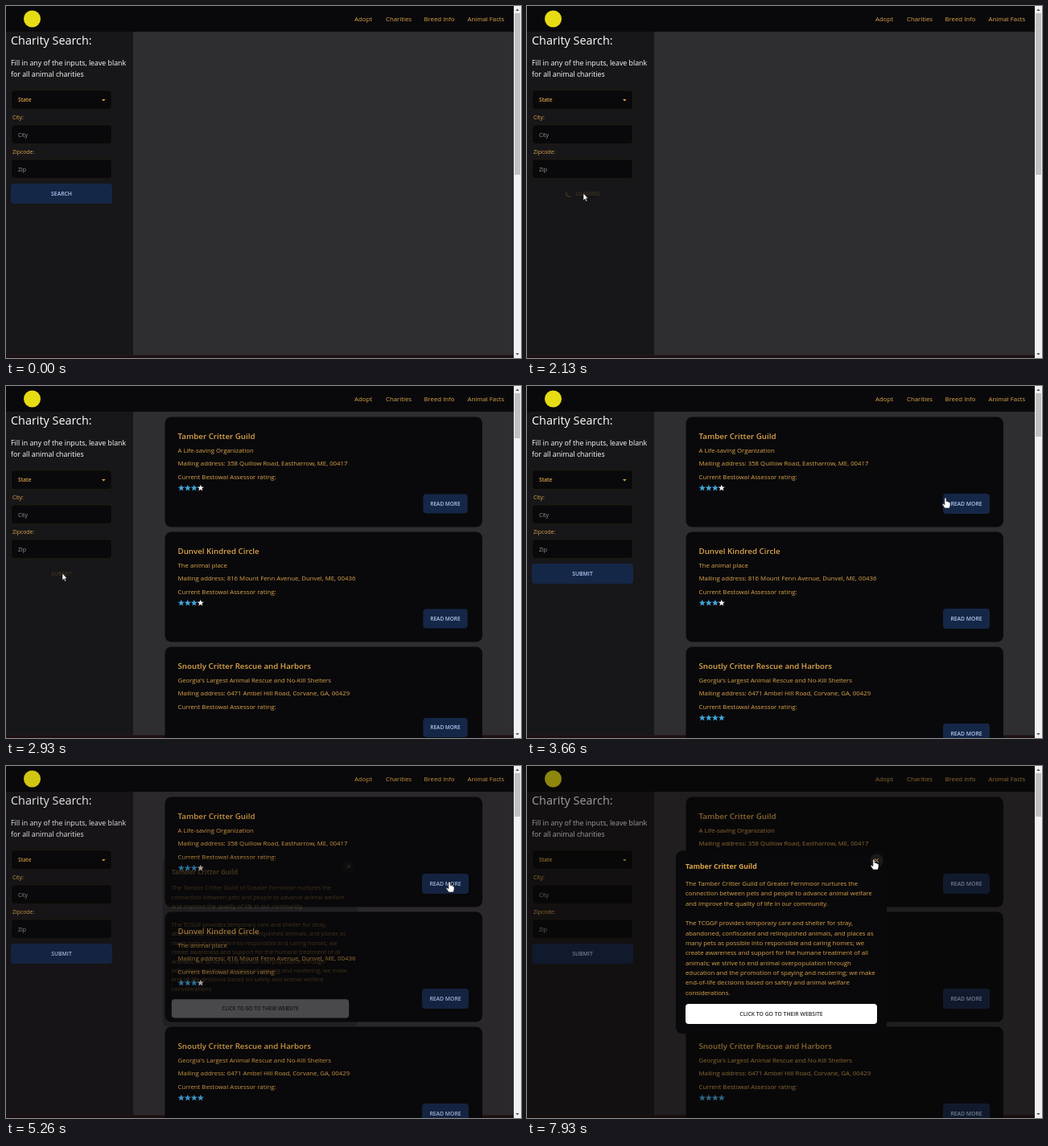
An HTML page that plays this animation: 640 px wide and 438 px high, repeating every 8 s.

```html
<!DOCTYPE html>
<html lang="en">
<head>
<meta charset="utf-8">
<title>Charity Search</title>
<style>
  html, body { margin: 0; width: 100%; height: 100%; overflow: hidden; background: #2e2d2f; }
  svg { display: block; width: 640px; height: 438px; }
  text { font: 7.8px "Open Sans", sans-serif; fill: #dca54c; white-space: pre; }
  .head { font-size: 14.4px; fill: #fff; }
  .lead { font-size: 8.8px; fill: #fff; }
  .label { font-size: 6.9px; }
  .hint { font-size: 6.9px; fill: #9a9a9c; }
  .select { font-size: 6.6px; font-weight: 600; }
  .title { font-size: 9.75px; font-weight: 600; }
  .modal-title { font-size: 8.7px; font-weight: 700; }
  .btn { transform-box: fill-box; transform-origin: center; }
  .btn text { font-size: 6.8px; font-weight: 600; text-anchor: middle; fill: #b3c8f0; }
  .btn.light text { fill: #2b2b2b; }
  .field { fill: #09090b; stroke: #2a2112; stroke-width: .7; }
</style>
</head>
<body>
<svg id="stage" viewBox="0 0 640 438"></svg>
<script>
const LOOP = 8000, TICK = 200 / 3;
const stage = document.getElementById('stage');

const text = (x, y, s, cls = '') => `<text x="${x}" y="${y}" class="${cls}">${s}</text>`;
const rect = (x, y, w, h, fill, rx = 0, more = '') =>
  `<rect x="${x}" y="${y}" width="${w}" height="${h}" rx="${rx}" fill="${fill}" ${more}/>`;
const field = y => rect(6.5, y, 125, 24, '', 4, 'class="field"');
const button = (x, y, w, label, cls = '', fill = '#152747') =>
  `<g class="btn ${cls}">${rect(x, y, w, 25, fill, 4)}${text(x + w / 2, y + 14.9, label)}</g>`;

function star(cx, cy, fill) {
  const points = Array.from({ length: 10 }, (_, i) => {
    const r = i % 2 ? 1.8 : 4.3, a = i * Math.PI / 5;
    return [cx + r * Math.sin(a), cy - r * Math.cos(a)].map(v => v.toFixed(2));
  });
  return `<polygon points="${points.join(' ')}" fill="${fill}"/>`;
}

function card(i, title, tagline, address, rating) {
  const stars = [0, 1, 2, 3].map(n => star(217.8 + n * 8, 127, n < rating ? '#42a5dc' : '#f2f2f2'));
  return `<g transform="translate(0 ${i * 143})">
    ${rect(197.5, 38.5, 394.5, 137, '#09090b', 8)}
    ${text(213.5, 66, title, 'title')}
    ${text(213.5, 82.7, tagline)}
    ${text(213.5, 99, 'Mailing address: ' + address)}
    ${text(213.5, 115.5, 'Current Bestowal Assessor rating:')}
    <g class="stars">${stars.join('')}</g>
    <g class="foot">${button(517, 134, 58, 'READ MORE', 'more')}</g>
  </g>`;
}

const story = [
  'The Tamber Critter Guild of Greater Fernmoor nurtures the',
  'connection between pets and people to advance animal welfare',
  'and improve the quality of life in our community.',
  '',
  'The TCGGF provides temporary care and shelter for stray,',
  'abandoned, confiscated and relinquished animals, and places as',
  'many pets as possible into responsible and caring homes; we',
  'create awareness and support for the humane treatment of all',
  'animals; we strive to end animal overpopulation through',
  'education and the promotion of spaying and neutering; we make',
  'end-of-life decisions based on safety and animal welfare',
  'considerations.'
];

stage.innerHTML = `
  ${rect(0, 0, 640, 438, '#2e2d2f')}
  ${rect(0, 434.5, 631, 4, '#1e1013')}
  <g id="results">
    ${card(0, 'Tamber Critter Guild', 'A Life-saving Organization', '358 Quillow Road, Eastharrow, ME, 00417', 3)}
    ${card(1, 'Dunvel Kindred Circle', 'The animal place', '816 Mount Fenn Avenue, Dunvel, ME, 00436', 3)}
    ${card(2, 'Snoutly Critter Rescue and Harbors', "Georgia's Largest Animal Rescue and No-Kill Shelters", '6471 Ambel Hill Road, Corvane, GA, 00429', 4)}
  </g>
  ${rect(0, 32, 158, 402.5, '#171618')}
  ${rect(0, 0, 631, 32, '#09090b')}
  <circle cx="32.5" cy="16" r="10.5" fill="#e6dc14"/>
  ${text(433, 19, 'Adopt')}${text(472, 19, 'Charities')}
  ${text(519.5, 19, 'Breed Info')}${text(573.5, 19, 'Animal Facts')}
  ${text(6, 47.7, 'Charity Search:', 'head')}
  ${text(6, 74, 'Fill in any of the inputs, leave blank', 'lead')}
  ${text(6, 88.3, 'for all animal charities', 'lead')}
  ${field(104.8)}${text(15, 119.2, 'State', 'select')}
  <path d="M119 116h4.6l-2.3 2.4z" fill="#dca54c"/>
  ${text(8, 140.8, 'City:', 'label')}
  ${field(147.8)}${text(15, 162.6, 'City', 'hint')}
  ${text(8, 183.8, 'Zipcode:', 'label')}
  ${field(190.8)}${text(15, 205.8, 'Zip', 'hint')}
  ${button(6, 221, 126, 'SEARCH', 'submit')}
  <path id="spinner" d="M2.6 -2.6A3.7 3.7 0 0 1 -2.6 2.6" fill="none" stroke="#dca54c" stroke-width="1.1" opacity=".25"/>
  ${rect(0, 0, 631, 438, '#0a0805', 0, 'id="shade"')}
  <g id="modal">
    ${rect(185, 105.5, 262, 227.5, '#09090b', 8)}
    <circle cx="434.5" cy="117.5" r="8.2" fill="#1a191b"/>
    <path d="M432.2 115.2l4.6 4.6m0-4.6l-4.6 4.6" stroke="#dca54c"/>
    ${text(197, 128.3, 'Tamber Critter Guild', 'modal-title')}
    ${story.map((line, i) => text(197, 149 + i * 12.33, line)).join('')}
    ${button(197, 296, 238, 'CLICK TO GO TO THEIR WEBSITE', 'light', '#fff')}
  </g>
  ${rect(631, 0, 9, 438, '#f1f1f1')}
  ${rect(632, 9, 7, 201, '#c1c1c1', 0, 'id="thumb"')}
  <path d="M633.3 6l2.2-2.6 2.2 2.6zM633.3 432l2.2 2.6 2.2-2.6z" fill="#505050"/>
  <g id="cursor" fill="#fff" stroke="#111" stroke-width=".6">
    <path id="arrow" d="M0 0V9l2-1.9 1.4 3.1 1.3-.6L3.4 6.6H6Z"/>
    <path id="hand" d="M-1.1 7V1Q0 -1 1.1 1V4.5Q2.4 4 3 5Q4.2 4.6 4.7 5.7Q5.8 5.6 6 6.6V9.5L5 13H-.8L-4 8.4Q-3.6 6.6 -1.1 8.6Z"/>
  </g>`;

const $ = id => document.getElementById(id);
const all = selector => [...stage.querySelectorAll(selector)];
const submit = all('.submit')[0], submitBox = submit.children[0], submitText = submit.children[1];
const moreButtons = all('.more'), lastFoot = all('.foot')[2], lastStars = all('.stars')[2];

const show = (el, on) => { el.style.display = on ? '' : 'none'; };
const clamp = p => Math.max(0, Math.min(1, p));
const ease = p => (p = clamp(p), p * p * (3 - 2 * p));
const within = (t, a, b) => t >= a && t < b;

// time, x, y of the pointer's hot spot
const route = [
  [730, 230, 60], [1130, 70, 233], [3200, 70, 233], [3666, 520, 139], [4000, 551, 144],
  [5800, 551, 144], [5860, 537, 145], [6200, 537, 145], [6460, 542, 146],
  [7066, 542, 146], [7130, 540, 145], [7400, 540, 145], [7930, 431, 116]
];

function pointer(t) {
  const i = route.findIndex(k => k[0] > t);
  if (i < 0) return route.at(-1).slice(1);
  if (i === 0) return route[0].slice(1);
  const [a, x, y] = route[i - 1], [b, u, v] = route[i], p = ease((t - a) / (b - a));
  return [x + (u - x) * p, y + (v - y) * p];
}

function pop(p) {
  if (p >= 1) return 1;
  return p < .4 ? .95 + .07 * p / .4 : 1.02 - .02 * (p - .4) / .6;
}

function draw(t) {
  const loading = within(t, 1590, 2900), loaded = t >= 2900;

  // search button: enabled, disabled while loading, enabled again
  const enabled = t < 2900 ? 1 - ease((t - 1590) / 200) : ease((t - 2933) / 200);
  submitBox.style.opacity = enabled;
  submitText.style.fill = `color-mix(in srgb, #b3c8f0 ${enabled * 100}%, #dca54c33)`;
  submitText.textContent = loading ? 'LOADING' : loaded ? 'SUBMIT' : 'SEARCH';
  submitText.setAttribute('x', loading ? 75.5 : 69);
  submit.style.scale = within(t, 1460, 1590) ? .97 : 1;
  show($('spinner'), loading);
  $('spinner').setAttribute('transform', `translate(52.3 233.7) rotate(${(t - 1630) * .18})`);

  // results
  const settled = t >= 2990;
  show($('results'), loaded);
  show(lastStars, settled);
  lastFoot.setAttribute('transform', `translate(0 ${settled ? 0 : -7.5})`);
  moreButtons.forEach(b => { b.style.scale = pop(clamp((t - 2930) / 250)); });
  if (within(t, 5060, 5190)) moreButtons[0].style.scale = .97;
  $('thumb').setAttribute('height', !loaded ? 201 : settled ? 54 : 56);

  // dialog
  const open = ease((t - 5200) / 200), size = .9 + .1 * open;
  $('shade').style.opacity = .4 * open;
  $('modal').style.opacity = open;
  $('modal').setAttribute('transform', `translate(316 219) scale(${size}) translate(-316 -219)`);

  // pointer
  const hand = within(t, 1000, 1590) || within(t, 3130, 3230) || within(t, 3640, 5850) || t >= 7880;
  show($('cursor'), t >= 730);
  show($('hand'), hand);
  show($('arrow'), !hand);
  $('cursor').setAttribute('transform', `translate(${pointer(t)})`);
}

function frame(now) {
  const t = now % LOOP;
  draw(Math.floor((t + 7) / TICK) * TICK % LOOP);
  requestAnimationFrame(frame);
}
frame(performance.now());
</script>
</body>
</html>
```
